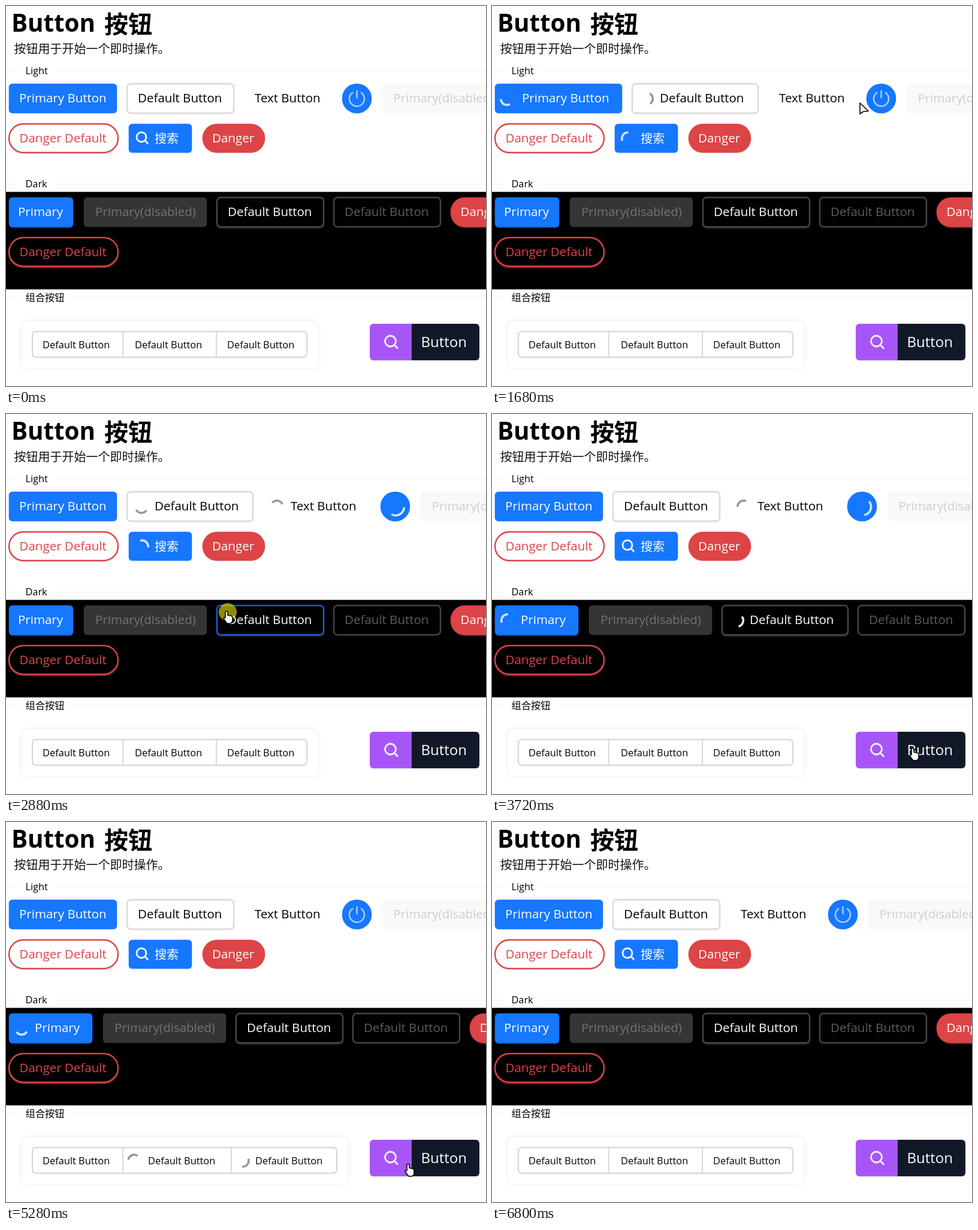
An HTML page with a canvas that plays this animation: 801x635 px, repeating every 6.84 s.

```html
<!DOCTYPE html>
<html lang="zh-CN">
<head>
<meta charset="utf-8">
<title>Button</title>
<style>
html, body { margin: 0; width: 100%; height: 100%; overflow: hidden; background: #fff; }
canvas { display: block; }
</style>
</head>
<body>
<canvas id="stage" width="801" height="635"></canvas>
<script>
const ctx = document.getElementById('stage').getContext('2d');
const LOOP = 6840, LOAD = 2000, SPIN = 950;
const LATIN = '"Open Sans", "Noto Sans", "Noto Sans CJK SC", "Noto Sans CJK", sans-serif';
const CJK = '"Noto Sans CJK SC", "Noto Sans CJK", sans-serif';
const BLUE = '#1677ff', RED = '#dc4446', GREY = '#d9d9d9';

// x is the resting left edge, tx the label offset, start the moment loading begins
const rows = [
  { y: 130, h: 49, items: [
    { x: 5, w: 180, fill: BLUE, text: 'Primary Button', tx: 17, color: '#fff', shadow: '#eef4fd', start: 580, spinX: 20 },
    { x: 202, w: 178, line: GREY, hover: '#4896ff', text: 'Default Button', tx: 18, color: '#000', shadow: '#f7f7f7', start: 900, spinX: 24 },
    { x: 397, w: 146, text: 'Text Button', tx: 18, color: '#000', start: 2310, spinX: 23 },
    { x: 561, w: 49, r: 24.5, fill: BLUE, icon: power, shadow: '#e6effd', start: 1934, spinX: 25, spinR: 14.5, grow: 0 },
    { x: 628, w: 205, fill: '#f9f9f9', text: 'Primary(disabled)', tx: 18.5, color: '#cecece', off: true }
  ] },
  { y: 197, h: 48, items: [
    { x: 5, w: 182, r: 24, line: RED, text: 'Danger Default', tx: 17.5, color: RED, shadow: '#faf3f3' },
    { x: 205, w: 105, fill: BLUE, icon: search, text: '搜索', tx: 43, color: '#fff', shadow: '#e6effd', start: 1275, spinX: 22, grow: 0 },
    { x: 328, w: 104, r: 24, fill: RED, text: 'Danger', tx: 16, color: '#fff', shadow: '#fbe9e9' }
  ] },
  { y: 320, h: 49, dark: true, items: [
    { x: 5, w: 107, fill: BLUE, text: 'Primary', tx: 15, color: '#fff', shadow: '#0d3f86', start: 3312, spinX: 21 },
    { x: 130, w: 205, fill: '#353535', text: 'Primary(disabled)', tx: 19, color: '#737373', off: true },
    { x: 352, w: 178, line: '#484848', hover: '#1560d4', text: 'Default Button', tx: 18, color: '#fff', shadow: '#222', start: 2885, spinX: 25 },
    { x: 547, w: 178, line: '#464646', text: 'Default Button', tx: 18, color: '#5c5c5c', off: true },
    { x: 742, w: 104, r: 24, fill: RED, text: 'Danger', tx: 16.5, color: '#fff', shadow: '#6d2022' }
  ] },
  { y: 387, h: 48, dark: true, items: [
    { x: 5, w: 182, r: 24, line: RED, text: 'Danger Default', tx: 17.5, color: RED, shadow: '#5a1c1d' }
  ] }
];

const group = [
  { x: 44, w: 151, tx: 17 },
  { x: 195, w: 156, tx: 20, start: 4795 },
  { x: 351, w: 151, tx: 18, start: 4396 }
];

const clicks = [...rows.flatMap(r => r.items), ...group].map(b => b.start).filter(Boolean);

// pointer path: time, x, y
const path = [
  [50, 806, 300], [500, 115, 158], [640, 118, 159], [840, 335, 151], [920, 343, 153],
  [980, 344, 156], [1230, 258, 221], [1500, 264, 224], [1680, 614, 162], [1860, 648, 157],
  [1990, 648, 157], [2240, 512, 157], [2380, 508, 159], [2820, 368, 330], [2920, 368, 330],
  [3240, 66, 345], [3350, 66, 345], [3720, 702, 559], [3950, 700, 564], [4320, 432, 567],
  [4440, 430, 567], [4720, 272, 566], [4840, 274, 567], [5050, 430, 620], [5280, 671, 572],
  [5500, 668, 570], [5880, 690, 640]
];

const arrowShape = new Path2D('M0 0V18.5L5.5 14.5 14 13.5Z');
const handShape = new Path2D('M-2 1Q0-2 2 1V6L8 7.5Q10 8 10 10V14Q10 19 6 20H1Q-2 17-5 12Q-4 9-2 11Z');

let now = 0;

function pointer() {
  const i = path.findIndex(p => p[0] > now);
  if (i < 1) return null;
  const [t0, x0, y0] = path[i - 1], [t1, x1, y1] = path[i];
  const u = (now - t0) / (t1 - t0), e = u * u * (3 - 2 * u);
  return { x: x0 + (x1 - x0) * e, y: y0 + (y1 - y0) * e };
}

const loading = b => b.start !== undefined && now >= b.start && now < b.start + LOAD;
const inside = (p, x, y, w, h) => !!p && p.x >= x && p.x <= x + w && p.y >= y && p.y <= y + h;

function box(x, y, w, h, r, fill, line, width = 2.4) {
  ctx.beginPath();
  ctx.roundRect(x, y, w, h, r);
  if (fill) { ctx.fillStyle = fill; ctx.fill(); }
  if (line) { ctx.strokeStyle = line; ctx.lineWidth = width; ctx.stroke(); }
}

function label(text, x, y, size, color = '#000', family = LATIN, weight = 400) {
  ctx.font = `${weight} ${size}px ${family}`;
  ctx.fillStyle = color;
  ctx.fillText(text, x, y);
}

function spinner(b, x, y, r, color) {
  const mid = (62 + (now - b.start) / SPIN * 360) * Math.PI / 180;
  ctx.beginPath();
  ctx.arc(x, y, r, mid - 1, mid + 1);
  ctx.strokeStyle = color;
  ctx.lineWidth = 3.6;
  ctx.stroke();
}

function power(x, y) {
  const cx = x + 24.5, cy = y + 25;
  ctx.beginPath();
  ctx.arc(cx, cy, 12.5, -Math.PI / 2 + 0.55, Math.PI * 1.5 - 0.55);
  ctx.moveTo(cx, cy - 14);
  ctx.lineTo(cx, cy - 1);
  ctx.strokeStyle = '#a9cdff';
  ctx.lineWidth = 2.5;
  ctx.stroke();
}

function lens(x, y, r) {
  ctx.beginPath();
  ctx.arc(x, y, r, 0, 7);
  ctx.moveTo(x + r * 0.7, y + r * 0.7);
  ctx.lineTo(x + r * 1.4, y + r * 1.4);
  ctx.strokeStyle = '#f3f4ff';
  ctx.lineWidth = 2.8;
  ctx.stroke();
}

function search(x, y) { lens(x + 21, y + 22, 8); }

// returns whether the pointer rests on something clickable
function drawRow(row, p) {
  let shift = 0, active = false;
  const { y, h } = row;
  for (const b of row.items) {
    const busy = loading(b), grow = b.grow ?? 32;
    const x = b.x + shift, w = b.w + (busy ? grow : 0), r = b.r || 6;
    const over = !b.off && inside(p, x, y, w, h);
    if (over && !busy) active = true;
    if (b.shadow) box(x, y + 2, w, h, r, b.line ? null : b.shadow, b.line && b.shadow);
    const pad = b.line ? 0 : 0.3;
    box(x - pad, y - pad, w + pad * 2, h + pad * 2, r, b.fill || (b.line && (row.dark ? '#000' : '#fff')), over && b.hover || b.line);
    if (busy) {
      const tint = b.fill ? '#d0e4ff' : row.dark ? '#e6e6e6' : '#999';
      spinner(b, x + b.spinX, y + h / 2 + 0.5, b.spinR || 10.3, tint);
    } else if (b.icon) b.icon(x, y);
    if (b.text) {
      const cjk = b.icon === search;
      label(b.text, x + b.tx + (busy && grow ? 28 : 0), y + h / 2 + (cjk ? 7.5 : 6.8), cjk ? 20 : 20.5, b.color, cjk ? CJK : LATIN);
    }
    if (busy) shift += grow;
  }
  return active;
}

function drawGroup(p) {
  const extra = group.filter(loading).length * 25;
  let shift = 0, active = false;
  ctx.save();
  ctx.shadowColor = 'rgba(0,0,0,.09)';
  ctx.shadowBlur = 9;
  box(26, 527, 494 + extra, 78, 9, '#fff');
  ctx.restore();
  box(44, 544, 458 + extra, 43, 6, '#fff', GREY);
  group.forEach((b, i) => {
    const busy = loading(b), x = b.x + shift, w = b.w + (busy ? 25 : 0);
    if (i) {
      ctx.fillStyle = GREY;
      ctx.fillRect(x - 1, 544, 2, 43);
    }
    if (busy) spinner(b, x + 19, 566, 10, '#999');
    label('Default Button', x + b.tx + (busy ? 22 : 0), 572, 16.4);
    if (inside(p, x, 544, w, 43) && !busy) active = true;
    if (busy) shift += 25;
  });
  return active;
}

function divider(y, text, right, family = LATIN) {
  ctx.fillStyle = '#f5f5f5';
  ctx.fillRect(0, y - 1, 20, 2);
  ctx.fillRect(right, y - 1, 801 - right, 2);
  label(text, 32.5, y + 5.5, 16.3, '#000', family);
}

function drawPointer(p, hand) {
  if (clicks.some(s => now >= s - 90 && now < s)) {
    ctx.beginPath();
    ctx.arc(p.x + 2, p.y + 1, 15, 0, 7);
    ctx.fillStyle = 'rgba(232,222,20,.62)';
    ctx.fill();
  }
  ctx.save();
  ctx.translate(p.x, p.y);
  ctx.lineJoin = 'round';
  ctx.lineWidth = 1.6;
  ctx.strokeStyle = '#000';
  ctx.fillStyle = '#fff';
  const shape = hand ? handShape : arrowShape;
  ctx.fill(shape);
  ctx.stroke(shape);
  ctx.restore();
}

function draw(time) {
  now = time % LOOP;
  const p = pointer();
  ctx.fillStyle = '#fff';
  ctx.fillRect(0, 0, 801, 635);

  label('Button', 9, 43, 40.3, '#000', LATIN, 700);
  label('按钮', 164, 45, 40, '#000', CJK, 700);
  label('按钮用于开始一个即时操作。', 13.5, 79, 20, '#111', CJK);
  divider(108, 'Light', 84);
  divider(297.5, 'Dark', 81);
  divider(487, '组合按钮', 112, CJK);
  ctx.fillStyle = '#000';
  ctx.fillRect(0, 310.6, 801, 162.9);

  let hand = false;
  for (const row of rows) hand = drawRow(row, p) || hand;
  hand = drawGroup(p) || hand;

  box(607, 533, 183, 61, 6, '#efeff1');
  box(607, 531, 71, 61, [6, 0, 0, 6], '#a855f7');
  box(677, 531, 113, 61, [0, 6, 6, 0], '#111827');
  lens(641.5, 560, 9);
  label('Button', 692.5, 570, 24, '#fff');
  hand = inside(p, 607, 531, 183, 61) || hand;

  if (p) drawPointer(p, hand);
}

const begin = performance.now();
function tick() {
  draw(performance.now() - begin);
  requestAnimationFrame(tick);
}
tick();
</script>
</body>
</html>
```
